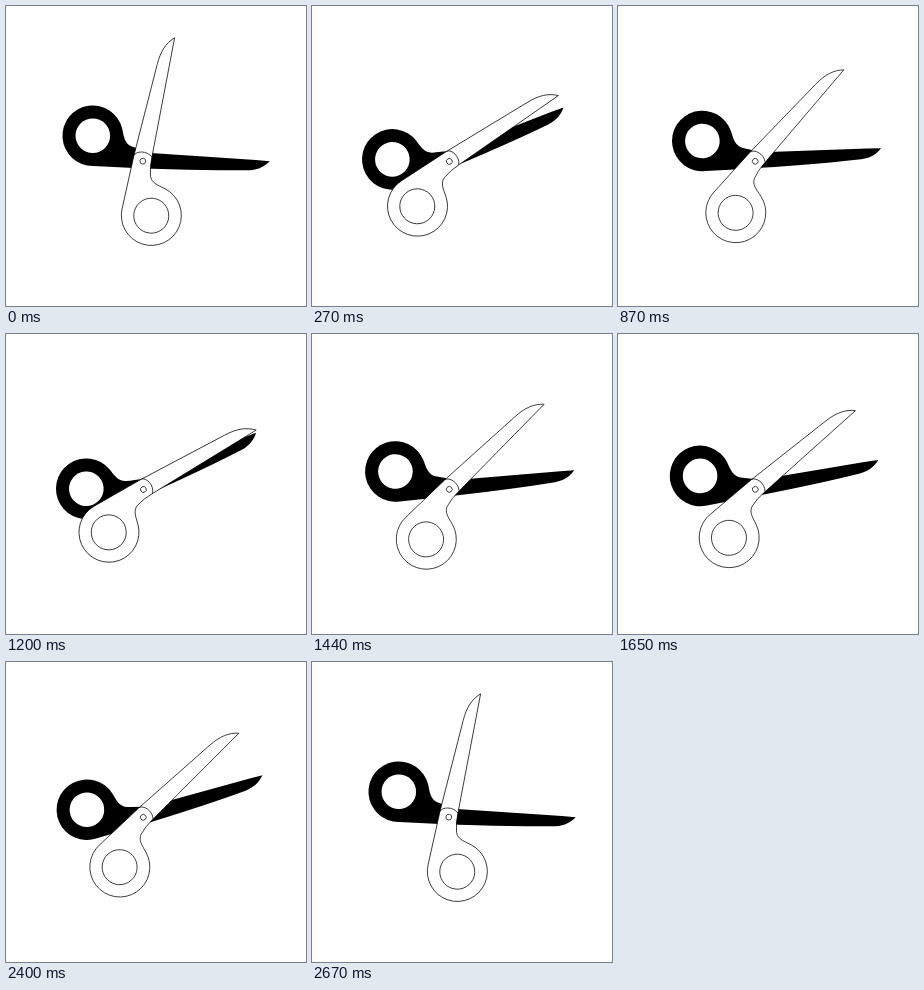
Write an HTML page that moves like this. It is 300x300 px and loops after 2700 ms.

```html
<!DOCTYPE html>
<html>
<head>
<meta charset="utf-8">
<style>
  html, body { margin: 0; height: 100%; overflow: hidden; background: #fff; }
  svg { display: block; width: 100%; height: 100%; }
</style>
</head>
<body>
<svg viewBox="0 0 300 300">
  <!-- both halves point right, with the screw at the origin -->
  <g id="dark">
    <path d="M127-.8C122 4 117 7.6 106 8.2Q50 9-50 4A30.3 30.3 0 1 1-20.5-33C-19-25-18-18.5-11-15.5Q-4-13 8-9L113-2Z"/>
    <circle cx="-50" cy="-26.3" r="17.3" fill="#fff"/>
  </g>
  <g id="light" fill="#fff" stroke="#000" stroke-width=".7" stroke-linejoin="round">
    <path d="M128.2.6L8 7.6Q-4 8-12 11C-18 13.7-18.6 19-20.5 28A30 30 0 1 1-50-8.7L4-10.2L98-9.8C112-9.8 121-6.5 128.2.6Z"/>
    <circle cx="-50" cy="21.3" r="17.5"/>
    <path d="M4-10.2C9-9.5 12.5 1 7 7.6" fill="none"/>
    <circle cx=".8" cy="-.2" r="2.9"/>
  </g>
</svg>
<script>
const LOOP = 2700, LEAD = 450, SHUT = 27.4;
const light = document.getElementById('light');
const dark = document.getElementById('dark');

function ramp(time, start, end) {
  const p = Math.min(1, Math.max(0, (time - start) / (end - start)));
  return p * p * (3 - 2 * p);
}

// rises from 0 to 1, stays until `close`, falls back to 0 at `end`
const snip = (time, start, open, close, end) =>
  ramp(time, start, open) - ramp(time, close, end);

function turn(blade, angle) {
  blade.setAttribute('transform', `translate(136.8 156) rotate(${-angle})`);
}

function draw() {
  // the blades start to open LEAD ms before the loop starts
  const time = (performance.now() + LEAD) % LOOP;
  const wide = snip(time, 0, 420, LEAD, 780);
  const middle = snip(time, 780, 1200, 1200, 1605);
  const small = snip(time, 1605, 1980, 1980, 2280);
  turn(light, SHUT + 48.5 * wide + 24 * middle + 17.3 * small);
  turn(dark, SHUT * (1 - wide - middle - 0.8 * small));
  requestAnimationFrame(draw);
}
draw();
</script>
</body>
</html>
```
